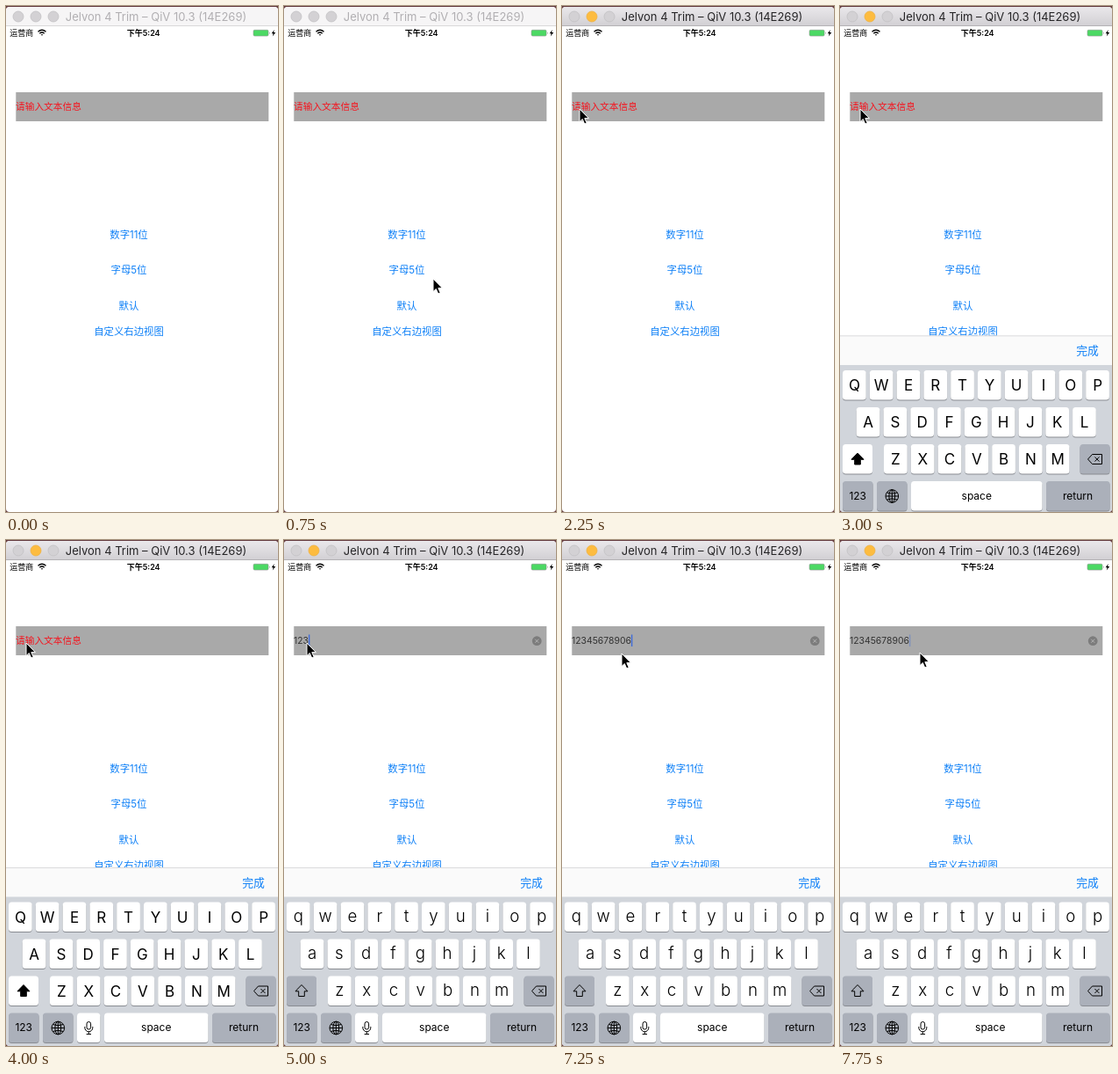
Animation, 310 px wide and 575 px high, one loop 8 s. Source, as an HTML page:

```html
<!DOCTYPE html>
<html lang="zh-CN">
<head>
<meta charset="utf-8">
<title>Text field demo</title>
<style>
  html, body { margin: 0; width: 100%; height: 100%; overflow: hidden; background: #643a3e; }
  svg { display: block; width: 310px; height: 575px; }
  text { font-family: Inter, "Noto Sans CJK SC", "Noto Sans CJK", sans-serif; white-space: pre; }
  .mid { text-anchor: middle; }
  .link { fill: #0f80f7; font-size: 11.4px; text-anchor: middle; }
  .line { fill: none; stroke: #000; stroke-width: 1; stroke-linejoin: round; }
</style>
</head>
<body>
<svg viewBox="0 0 310 575">
  <defs>
    <linearGradient id="bar" x2="0" y2="1">
      <stop stop-color="#ebe9ec"/><stop offset="1" stop-color="#d2d0d4"/>
    </linearGradient>
    <clipPath id="window"><rect y="1" width="310" height="574" rx="4"/></clipPath>
  </defs>
  <g clip-path="url(#window)">
    <rect width="310" height="575" fill="#fff"/>

    <rect id="titleBar" width="310" height="22"/>
    <rect id="titleEdge" y="22" width="310" height="1"/>
    <g stroke-width=".8">
      <circle cx="14" cy="12" r="6" fill="#d3d1d4" stroke="#c2c0c3"/>
      <circle id="minimize" cx="34" cy="12" r="6"/>
      <circle cx="54" cy="12" r="6" fill="#d3d1d4" stroke="#c2c0c3"/>
    </g>
    <text id="title" class="mid" x="171" y="17" font-size="13">Jelvon 4 Trim – QiV 10.3 (14E269)</text>

    <text x="4.3" y="34" font-size="9">运营商</text>
    <g fill="none" stroke="#000" stroke-width="1.4">
      <path d="M36.5 29.2Q41 25.2 45.5 29.2M38.3 31.2Q41 28.9 43.7 31.2"/>
      <path d="M39.6 32.2H42.4L41 33.8Z" fill="#000" stroke="none"/>
    </g>
    <text class="mid" x="156.7" y="34" font-size="9" font-weight="600">下午5:24</text>
    <rect x="282" y="27.3" width="17" height="6.8" rx="1.4" fill="#4cd964" stroke="#8c938d" stroke-width=".6"/>
    <path d="M300 29.5q1.4 1.2 0 2.4z" fill="#777"/>
    <path d="M305.8 27 302.6 31.3H304.6L303.8 34.4 307.2 30H305.1Z"/>

    <rect x="11.3" y="98" width="288" height="33" fill="#a9a9a9"/>
    <text id="hint" x="11" y="118" font-size="10.7" fill="#f5141e">请输入文本信息</text>
    <text id="value" x="11" y="118" font-size="10.4" fill="#333"></text>
    <rect id="caret" y="107.5" width="1.4" height="13.5" fill="#3f6bd8"/>
    <g id="clear">
      <circle cx="288.2" cy="114.7" r="5.4" fill="#7c7c7c"/>
      <path d="M286.2 112.7l4 4m0-4l-4 4" stroke="#b5b5b5"/>
    </g>

    <text id="digits" class="link" x="140" y="263.8">数字11位</text>
    <text class="link" x="140" y="303.8">字母5位</text>
    <text class="link" x="140" y="344.8">默认</text>
    <text class="link" x="140" y="373.6">自定义右边视图</text>

    <g id="keyboard">
      <rect y="372" width="310" height="34" fill="#fafafa"/>
      <rect y="372" width="310" height=".8" fill="#d4d4d6"/>
      <text x="269.2" y="393.6" font-size="12.8" fill="#0f80f7">完成</text>
      <rect y="405.5" width="310" height="180" fill="#d1d5db"/>
      <g id="keys"></g>
      <path id="shiftIcon" d="M20 505.5 27 512.8H23.3V518.5H16.7V512.8H13Z" stroke="#000" stroke-linejoin="round"/>
      <g class="line">
        <path d="M282.5 512.5 287.5 507H298.5V518H287.5ZM290.4 510l5 5m0-5l-5 5"/>
        <circle cx="59.3" cy="554.5" r="7.3"/>
        <ellipse cx="59.3" cy="554.5" rx="3.4" ry="7.3"/>
        <path d="M59.3 547.2V561.8M52 554.5H66.6M53.5 550.5Q59.3 553 65.1 550.5M53.5 558.5Q59.3 556 65.1 558.5"/>
      </g>
      <g id="mic" class="line">
        <rect x="92" y="547.5" width="4.6" height="8.6" rx="2.3"/>
        <path d="M89.8 553v1.2a4.5 4.5 0 0 0 9 0V553M94.3 558.8V561.6M91.6 561.6H97"/>
      </g>
    </g>
  </g>
  <path id="pointer" d="M0 0V14.6L3.3 11.5 5.7 17 8.2 16 5.8 10.6H10.4Z" stroke="#fff" stroke-width="1"/>
</svg>
<script>
const LOOP = 8000, STEP = 250;
const $ = id => document.getElementById(id);
const set = (id, attrs) => {
  for (const name in attrs) $(id).setAttribute(name, attrs[name]);
};
const show = (id, visible) => { $(id).style.display = visible ? '' : 'none'; };

function addTo(parent, tag, attrs, text = '') {
  const node = document.createElementNS('http://www.w3.org/2000/svg', tag);
  for (const name in attrs) node.setAttribute(name, attrs[name]);
  node.textContent = text;
  return parent.appendChild(node);
}

function addKey(x, y, width, fill = '#fff', id = '') {
  const box = { x, width, height: 33.5, rx: 3.5 };
  const shadow = addTo($('keys'), 'rect', { ...box, y: y + 1, fill: '#898c92' });
  const face = addTo($('keys'), 'rect', { ...box, y, fill });
  if (id) { face.id = id; shadow.id = id + 'Shadow'; }
}

const GRAY = '#abb0ba';
const letters = [];
[['QWERTYUIOP', 3], ['ASDFGHJKL', 18.7], ['ZXCVBNM', 50]].forEach(([row, left], r) => {
  [...row].forEach((char, i) => {
    const x = left + i * 30.8, y = 411.5 + r * 42;
    addKey(x, y, 26.7);
    const label = addTo($('keys'), 'text', { x: x + 13.4, class: 'mid' }, char);
    letters.push({ label, char, y });
  });
});
addKey(3, 495.5, 34, '#fff', 'shiftKey');
addKey(273.5, 495.5, 34, GRAY);
addKey(3, 537.5, 34.5, GRAY);
addKey(42, 537.5, 34.5, GRAY);
addKey(81, 537.5, 26.3, '#fff', 'micKey');
addKey(112, 537.5, 118.5, '#fff', 'spaceKey');
addKey(235, 537.5, 72.5, GRAY);
const addLabel = (x, text) =>
  addTo($('keys'), 'text', { x, y: 558, class: 'mid', 'font-size': 12 }, text);
addLabel(20.2, '123');
const spaceLabel = addLabel(171, 'space');
addLabel(271, 'return');

// Pointer stops: step, x, y
const route = [[3, 170, 310], [4, 140, 266], [5, 140, 266], [9, 20, 117], [11, 20, 117],
  [12, 23, 117], [18, 23, 117], [19, 26, 117], [24, 26, 117], [25, 37, 121],
  [29, 68, 129], [30, 88, 128], [31, 91, 128]];

function pointerAt(step) {
  const next = Math.max(1, route.findIndex(stop => stop[0] >= step));
  const [a, b] = [route[next - 1], route[next]];
  const k = (step - a[0]) / (b[0] - a[0]);
  return [a[1] + (b[1] - a[1]) * k, a[2] + (b[2] - a[2]) * k];
}

function draw(step) {
  const active = step >= 4;
  set('titleBar', { fill: active ? 'url(#bar)' : '#f6f5f6' });
  set('titleEdge', { fill: active ? '#b4b2b5' : '#d9d8d9' });
  set('title', { fill: active ? '#262527' : '#b1afb2' });
  set('minimize', active ? { fill: '#fdbc40', stroke: '#eeb145' }
                         : { fill: '#d3d1d4', stroke: '#c2c0c3' });
  set('digits', { opacity: step === 5 ? 0.45 : 1 });

  const typing = step >= 18;
  const count = typing ? Math.min(11, Math.floor((step - 18) * 1.35) + 1) : 0;
  $('value').textContent = '12345678906'.slice(0, count);
  show('hint', !typing);
  show('clear', typing);
  const steady = typing && step <= 26;
  set('caret', {
    x: 11 + (count ? $('value').getComputedTextLength() : 0),
    opacity: step < 13 ? 0 : steady ? 1 : [0, 1, 1, 0.4][step % 4]
  });

  const settled = step >= 13;
  show('keyboard', step >= 12);
  set('keyboard', { transform: `translate(0 ${settled ? 0 : 2.5})` });
  for (const id of ['mic', 'micKey', 'micKeyShadow']) show(id, settled);
  const space = settled ? { x: 112, width: 118.5 } : { x: 81, width: 149.5 };
  set('spaceKey', space);
  set('spaceKeyShadow', space);
  spaceLabel.setAttribute('x', space.x + space.width / 2);
  for (const { label, char, y } of letters) {
    label.textContent = typing ? char.toLowerCase() : char;
    label.setAttribute('font-size', typing ? 18.7 : 17);
    label.setAttribute('font-weight', typing ? 300 : 400);
    label.setAttribute('y', y + (typing ? 22.5 : 23));
  }
  set('shiftKey', { fill: typing ? GRAY : '#fff' });
  set('shiftIcon', { fill: typing ? 'none' : '#000' });

  show('pointer', step >= 3);
  if (step >= 3) set('pointer', { transform: `translate(${pointerAt(step)})` });
}

const start = performance.now();
function tick() {
  draw(Math.floor((performance.now() - start) % LOOP / STEP));
  requestAnimationFrame(tick);
}
tick();
</script>
</body>
</html>
```
